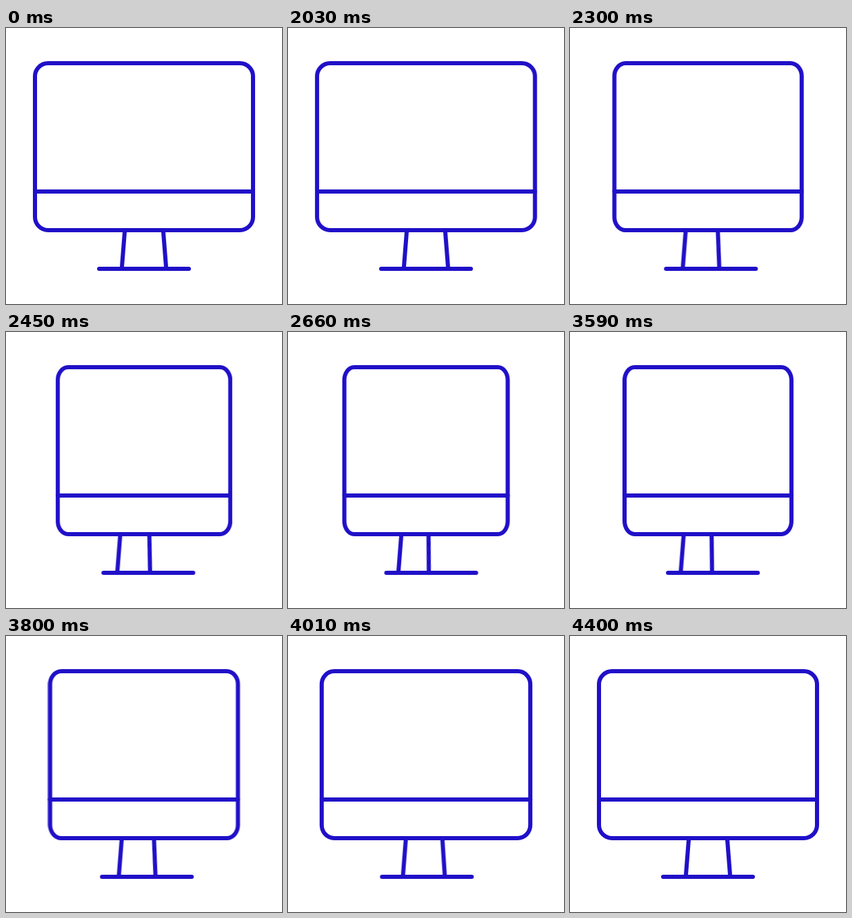
Animation, 400 px wide and 400 px high, one loop 4430 ms. Source, as an HTML page without scripts:

```html
<!DOCTYPE html>
<html lang="en">
<head>
<meta charset="utf-8">
<title>Turning monitor</title>
<style>
  html, body {
    margin: 0;
    width: 100%;
    height: 100%;
    overflow: hidden;
    background: #fff;
  }
  svg {
    display: block;
    width: 100%;
    height: 100%;
    fill: none;
    stroke: #2010c8;
    stroke-width: 6;
    stroke-linecap: round;
  }
  svg * {
    vector-effect: non-scaling-stroke;
  }
  .part {
    animation: turn 4430ms linear infinite;
  }
  .screen {
    --turned: scaleX(.7215);
    transform-origin: 200px 0;
  }
  .left-leg {
    --turned: translateX(-8.8px);
  }
  .right-leg {
    --turned: translateX(-26.8px) skewX(-4.5deg);
    transform-origin: 227.8px 293px;
  }
  .base {
    --turned: translateX(8.4px);
  }
  /* rest until 2000 ms, turned at 3200 ms, back at 4400 ms */
  @keyframes turn {
    0% { transform: none; }
    45.147% {
      transform: none;
      animation-timing-function: cubic-bezier(.33, 0, 0, 1);
    }
    72.235% {
      transform: var(--turned);
      animation-timing-function: cubic-bezier(.6, 0, .4, 1);
    }
    99.323%, 100% { transform: none; }
  }
</style>
</head>
<body>
<svg viewBox="0 0 400 400">
  <g class="part screen">
    <rect x="42" y="51" width="316" height="242" rx="19"/>
    <path d="M42 237H358"/>
  </g>
  <path class="part left-leg" d="M172.2 293L167.8 349"/>
  <path class="part right-leg" d="M227.8 293L232.2 349"/>
  <path class="part base" d="M135 349H265"/>
</svg>
</body>
</html>
```
